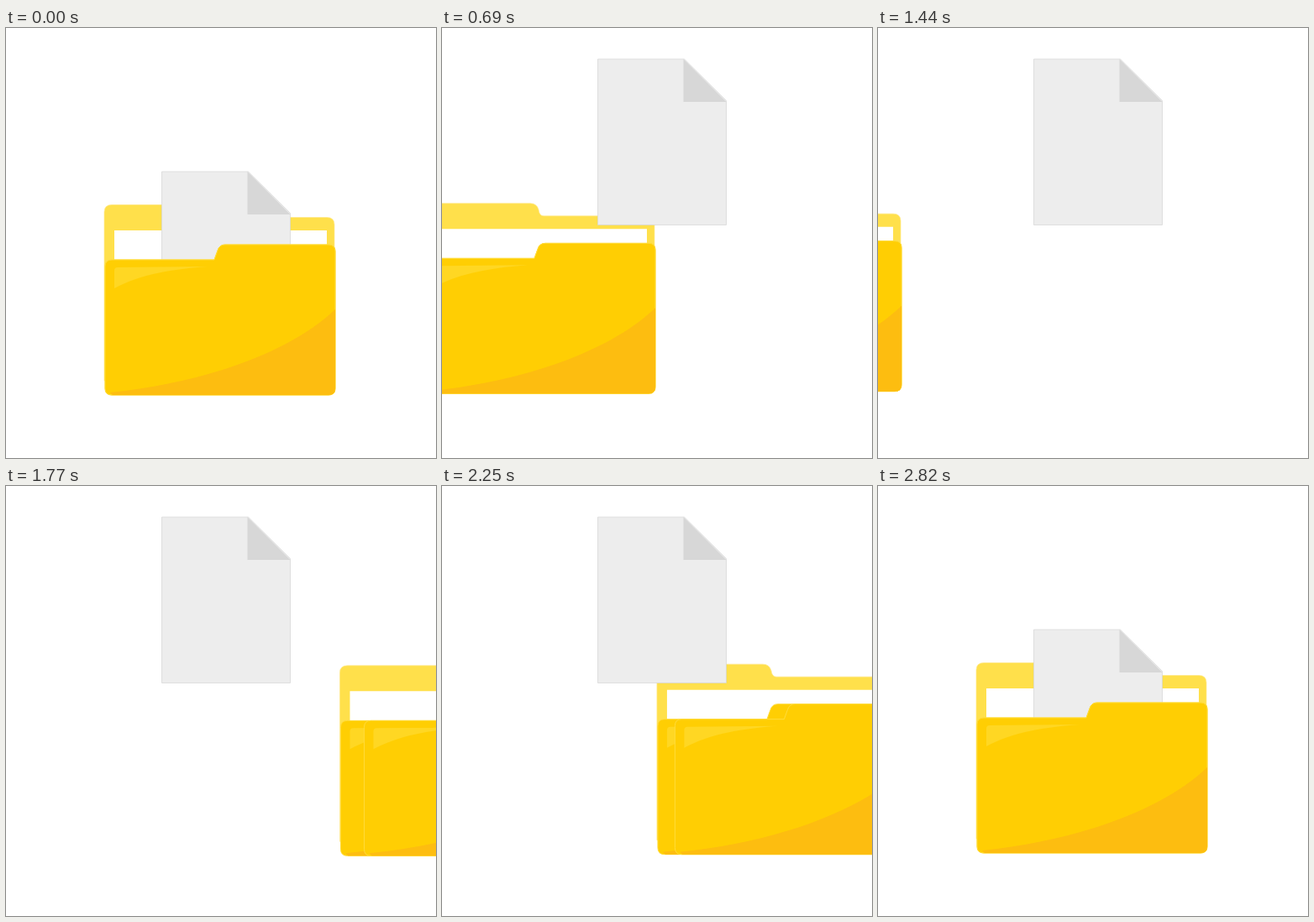
These frames come from a looping animation (512x512 px, 2970 ms). An HTML page:

```html
<!DOCTYPE html>
<html lang="en">
<head>
<meta charset="utf-8">
<title>Folder and sheet</title>
<style>
  html, body { margin: 0; width: 100%; height: 100%; overflow: hidden; background: #fff; }
  svg { display: block; width: 100vw; height: 100vh; }
</style>
</head>
<body>
<svg viewBox="0 0 512 512">
  <defs>
    <g id="front">
      <path fill="#ffce03" stroke="#ffdc3c" stroke-width="1"
        d="M118 284Q118 276 126 276H248L252 265Q254 258 261 258H384Q392 258 392 266V429Q392 437 384 437H126Q118 437 118 429Z"/>
      <path fill="#fdbd10" d="M124 434C240 422 340 385 392 335V429Q392 437 384 437H127Z"/>
      <path fill="#ffd723" d="M129 310V289Q129 285 133 285L240 284C200 287 160 293 129 310Z"/>
    </g>
  </defs>
  <g id="back">
    <path fill="#ffe04b" stroke="#ffe98a" stroke-width=".7"
      d="M117 219Q117 210.500 126 210.500H243Q251 210.500 253 218Q254 225.500 259 225.500H382Q391 225.500 391 234V420H117Z"/>
    <path fill="#fff" d="M129 241H382V300H129Z"/>
  </g>
  <g id="sheet">
    <path fill="#ededed" stroke="#d4d4d4" stroke-width=".7" d="M185.500 171H288.500L338.500 220.500V368.500H185.500Z"/>
    <path fill="#d7d7d7" d="M287.500 171L338.500 222H287.500Z"/>
  </g>
  <use id="lower" href="#front"/>
  <use id="upper" href="#front"/>
</svg>
<script>
  const LOOP = 2970, HOLD = 180, STEP = 30, LAST = 88;
  const EXIT_END = 40.6, CUT = 45, ENTER = 49;
  const LEFT = -364, RIGHT = 289, GAP = 28, LIFT = -134, TILT = 0.012;
  const [back, sheet, lower, upper] =
    ["back", "sheet", "lower", "upper"].map(id => document.getElementById(id));

  // eased progress from step a to step b
  function ease(k, a, b) {
    const u = Math.min(1, Math.max(0, (k - a) / (b - a)));
    return u * u * (3 - 2 * u);
  }

  function move(el, x, y) {
    el.setAttribute("transform", `translate(${x.toFixed(2)} ${y.toFixed(2)})`);
  }

  function draw(time) {
    const t = time % LOOP;
    const k = Math.min(LAST, Math.max(0, Math.floor((t - HOLD) / STEP)));
    const enter = ease(k, ENTER, LAST);
    const leaving = k < CUT;
    const x = leaving ? LEFT * ease(k, 0, EXIT_END) : RIGHT * (1 - enter);
    const y = x * TILT;
    const gap = leaving ? 0 : GAP * (1 - enter * enter);

    move(back, x, y);
    move(lower, x, y);
    move(upper, x + gap, y);
    move(sheet, 0, LIFT * (ease(k, 0, 12.2) - ease(k, LAST - 12.2, LAST)));
  }

  const start = performance.now();
  function tick() {
    draw(performance.now() - start);
    requestAnimationFrame(tick);
  }
  tick();
</script>
</body>
</html>
```
